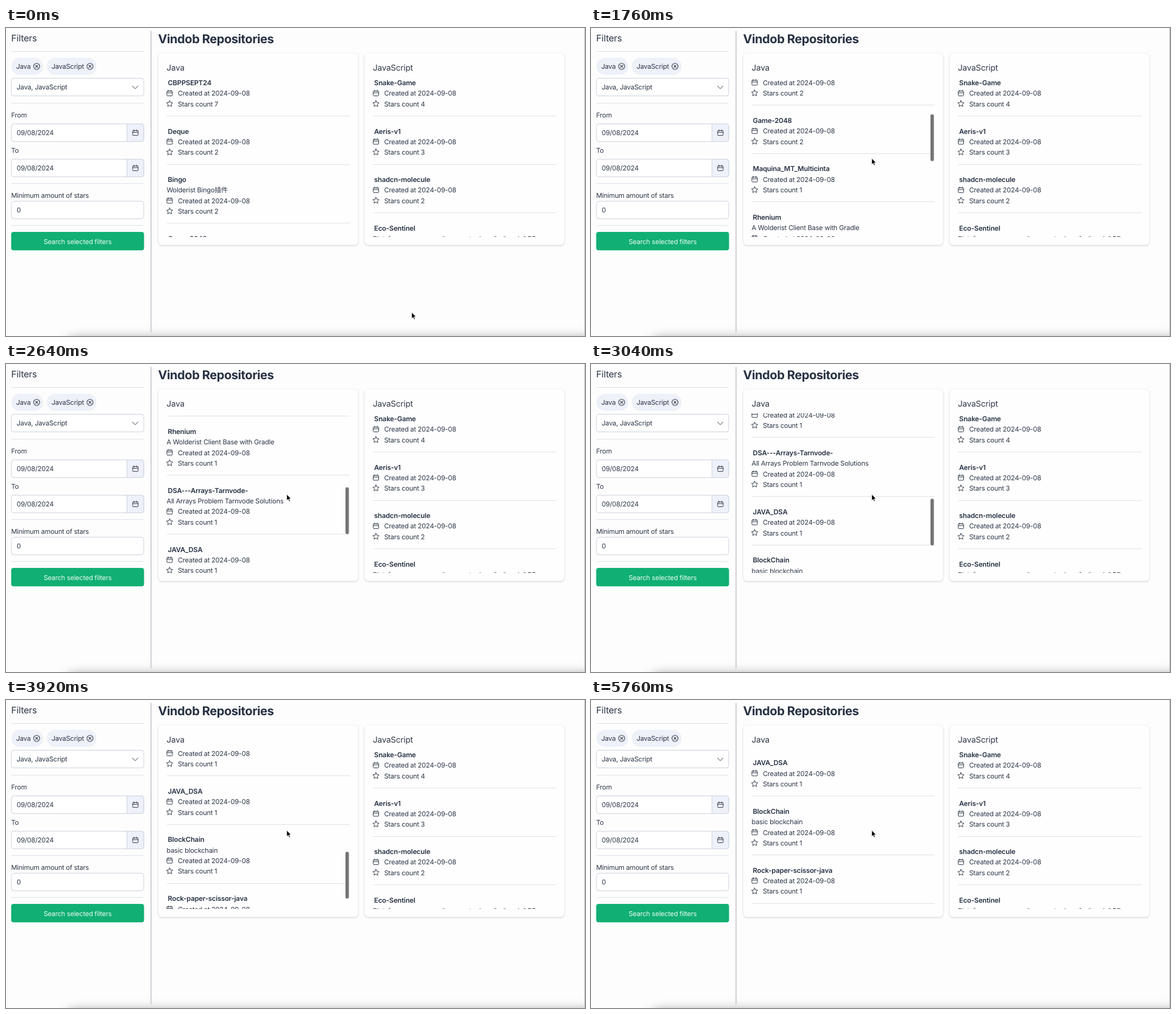
An HTML page that plays this animation: 950 by 506 pixels, repeating every 6000 ms.

```html
<!DOCTYPE html>
<html lang="en">
<head>
<meta charset="utf-8">
<title>Repository filters</title>
<style>
  html, body { margin: 0; width: 100%; height: 100%; overflow: hidden; background: #fdfdfd; }
  svg { display: block; width: 950px; height: 506px; }
  text {
    font: 11px Inter, "Noto Sans CJK SC", "Noto Sans CJK", sans-serif;
    letter-spacing: -.2px; fill: #2d3748; text-rendering: geometricPrecision;
  }
  .head { font-size: 13.4px; letter-spacing: -.15px; }
  .side { font-size: 15px; letter-spacing: -.15px; }
  .name { font-size: 11.2px; font-weight: 600; letter-spacing: -.14px; fill: #263143; }
  .title { font-size: 20px; font-weight: 700; letter-spacing: -.4px; fill: #263143; }
  .button { fill: #e9fbf3; text-anchor: middle; }
  .icon { fill: none; stroke: #3b4453; stroke-linejoin: round; stroke-linecap: round; }
  .rule { stroke: #dfe2e7; shape-rendering: crispEdges; }
  .field { fill: #fff; stroke: #cdd4de; }
  .card { fill: #fefefe; filter: drop-shadow(0 1px 1.5px rgba(0, 0, 0, .18)); }
  .dock { fill: #8c8c8c; filter: blur(9px); }
</style>
</head>
<body>
<svg id="stage" viewBox="0 0 950 506"></svg>
<script>
const LOOP = 6000, STEP = 80;
const DATE = "Created at 2024-09-08";

// Each entry: name, star count, optional description
const javaRepos = [
  ["CBPPSEPT24", 7], ["Deque", 2], ["Bingo", 2, "Wolderist Bingo插件"], ["Game-2048", 2],
  ["Maquina_MT_Multicinta", 1], ["Rhenium", 1, "A Wolderist Client Base with Gradle"],
  ["DSA---Arrays-Tarnvode-", 1, "All Arrays Problem Tarnvode Solutions"], ["JAVA_DSA", 1],
  ["BlockChain", 1, "basic blockchain"], ["Rock-paper-scissor-java", 1]
];
const scriptRepos = [
  ["Snake-Game", 4], ["Aeris-v1", 3], ["shadcn-molecule", 2],
  ["Eco-Sentinel", 1, "Plataforma para o monitoramento da ação “verde” BR"]
];

// Text is placed by the middle of its capitals
const text = (x, y, str, cls = "", size = 11) =>
  `<text x="${x}" y="${y + size * .364}" class="${cls}">${str}</text>`;
const rule = (x1, x2, y) => `<path class="rule" d="M${x1} ${y}H${x2}"/>`;
const icon = (x, y, d, width = 1) =>
  `<path class="icon" stroke-width="${width}" transform="translate(${x} ${y})" d="${d}"/>`;
const rect = (x, y, w, h, r, attrs) =>
  `<rect x="${x}" y="${y}" width="${w}" height="${h}" rx="${r}" ${attrs}/>`;

const CALENDAR = "M-3.5-3.7h7q1 0 1 1v6q0 1-1 1h-7q-1 0-1-1v-6q0-1 1-1zM-4.5-.8h9M-2.2-5v2.3M2.2-5v2.3";
const CROSS = "M5 0A5 5 0 1 1-5 0A5 5 0 1 1 5 0M-1.9-1.9l3.8 3.8M1.9-1.9l-3.8 3.8";
const STAR = "M" + Array.from({ length: 10 }, (_, i) => {
  const r = i % 2 ? 2.6 : 5.4, a = i * Math.PI / 5;
  return `${(r * Math.sin(a)).toFixed(2)} ${(-r * Math.cos(a)).toFixed(2)}`;
}).join("L") + "z";

function repoList(repos, x) {
  let y = 90, out = "";
  for (const [name, stars, about] of repos) {
    out += text(x + 2.5, y, name, "name", 11.2);
    if (about) out += text(x + .5, y += 17.4, about);
    out += icon(x + 5.5, y + 17.2, CALENDAR) + text(x + 19, y + 17.4, DATE)
      + icon(x + 5.5, y + 34.6, STAR) + text(x + 19, y + 34.8, "Stars count " + stars)
      + rule(x + .5, x + 301, y + 54.5);
    y += 79.5;
  }
  return out;
}

const card = (x, label, repos, id) =>
  rect(x, 41.5, 327.5, 315, 6, 'class="card"') + text(x + 13.5, 65.5, label, "head", 13.4)
  + `<g clip-path="url(#list)"><g id="${id}">${repoList(repos, x + 13)}</g></g>`;

const chip = (x, w, label) =>
  rect(x, 49, w, 28, 14, 'fill="#eef1f8"') + text(x + 7.7, 63, label) + icon(x + w - 10.7, 63, CROSS, 1.1);

const field = (y, value) => rect(9, y, 217, 29, 4, 'class="field"') + text(17.5, y + 14.7, value);

const dateField = (y, label) =>
  text(8.5, y - 14.3, label) + field(y, "09/08/2024")
  + `<path d="M198.5 ${y}H222q4 0 4 4v21q0 4-4 4H198.5z" fill="#eef1f9" stroke="#cdd4de"/>`
  + icon(212.3, y + 14.7, CALENDAR);

const stage = document.getElementById("stage");
stage.innerHTML =
  `<clipPath id="list"><path d="M250 81H916V343.3H250z"/></clipPath>`
  + rect(92, 510, 900, 60, 26, 'class="dock"')
  + `<path d="M949.5 0V506" stroke="#b9bbbe"/><path d="M238 5V500" stroke="#d0d2d8" stroke-width="2"/>`
  + text(8.5, 17, "Filters", "side", 15)
  + [38.5, 123.5, 255.5, 324.5].map(y => rule(9, 226, y)).join("")
  + chip(9, 52, "Java") + chip(67, 81.5, "JavaScript")
  + field(82.5, "Java, JavaScript") + icon(212, 97.5, "M-4.5-2.2L0 2.3L4.5-2.2")
  + dateField(157.5, "From") + dateField(215.5, "To")
  + text(8.5, 275.3, "Minimum amount of stars") + field(284.5, "0")
  + rect(8.5, 335, 218, 30.2, 4, 'fill="#11af73"') + text(117.5, 350.5, "Search selected filters", "button")
  + text(249.5, 18, "Vindob Repositories", "title", 20)
  + card(250, "Java", javaRepos, "scroller") + card(588.5, "JavaScript", scriptRepos, "fixed")
  + rect(557, 0, 5.6, 77, 2.8, 'id="thumb" fill="#757575"')
  + `<path id="cursor" d="M0 0V10.4L2.4 8.2L4 11.9L5.7 11.2L4.1 7.5H7.2z" fill="#000" stroke="#fff" stroke-width=".8"/>`;

const [scroller, thumb, cursor] = ["scroller", "thumb", "cursor"].map(id => document.getElementById(id));
const clamp = v => Math.min(1, Math.max(0, v));
const smooth = v => v * v * (3 - 2 * v);

// Scroll offset over time, joined by a smooth curve
const knots = [[880, 0], [1280, 69], [2240, 316], [3040, 456], [3920, 549], [4240, 572], [4320, 572], [4560, 595.5]];
const slope = i => {
  const a = knots[i - 1], b = knots[i + 1];
  return a && b ? (b[1] - a[1]) / (b[0] - a[0]) : 0;
};
function scrollAt(t) {
  const i = knots.findIndex(k => t < k[0]);
  if (i === 0) return 0;
  if (i < 0) return knots[knots.length - 1][1];
  const [t0, s0] = knots[i - 1], [t1, s1] = knots[i];
  const d = t1 - t0, u = (t - t0) / d;
  return s0 + (s1 - s0) * smooth(u)
    + d * u * (1 - u) * (slope(i - 1) * (1 - u) - slope(i) * u);
}

function draw(now) {
  const t = Math.floor(now % LOOP / STEP) * STEP;
  const scroll = scrollAt(t), move = smooth(clamp((t - 240) / 320));
  scroller.setAttribute("transform", `translate(0 ${-scroll})`);
  thumb.setAttribute("y", 83 + scroll * .303);
  thumb.setAttribute("opacity", t < 960 ? 0 : clamp(1 - (t - 4800) / 400));
  cursor.setAttribute("transform", `translate(${665.6 - 205 * move} ${467 - 253 * move})`);
}

const start = performance.now();
function tick() {
  draw(performance.now() - start);
  requestAnimationFrame(tick);
}
tick();
</script>
</body>
</html>
```
